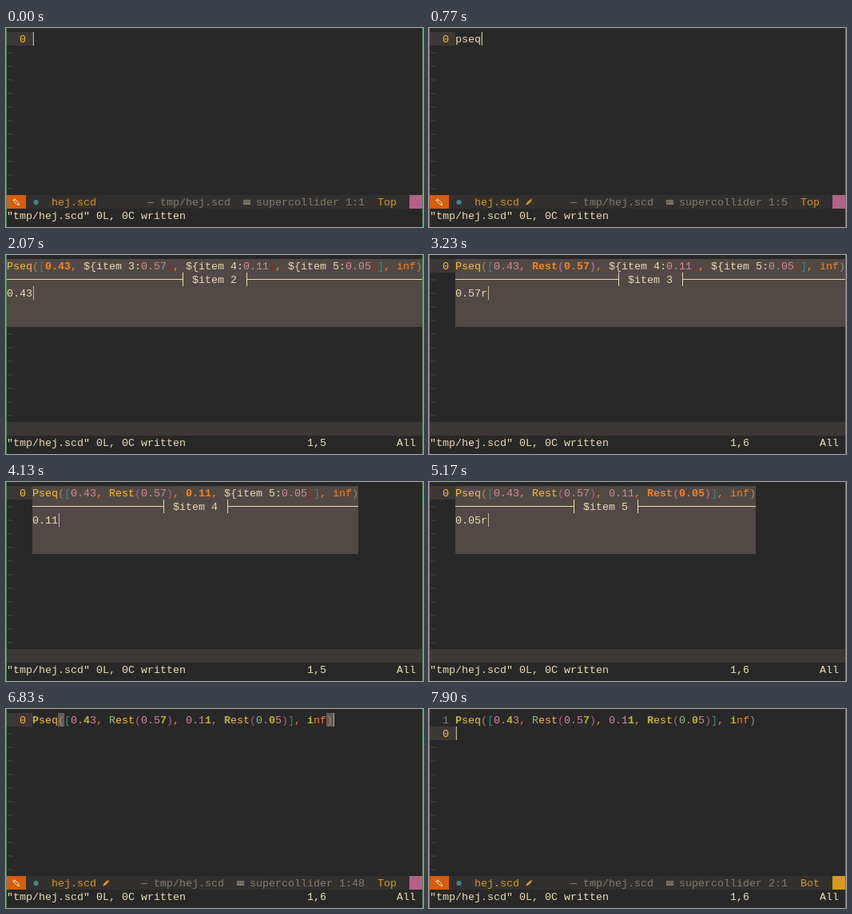
Write an HTML page that moves like this. It is 522 by 249 pixels and loops after 8000 ms.

```html
<!DOCTYPE html>
<html lang="en">
<head>
<meta charset="utf-8">
<title>Snippet expansion in an editor</title>
<style>
html, body { margin: 0; width: 100%; height: 100%; overflow: hidden; background: #282828; }
svg { display: block; width: 522px; height: 249px; }
text { white-space: pre; fill: #ebdbb2; font-family: "Liberation Mono", "Noto Sans Mono", monospace; }
.name, .here { fill: #fabd2f; }
.num { fill: #d3869b; }
.inf, .comma { fill: #fe8019; }
.d1 { fill: #a28c75; }
.d2 { fill: #458588; }
.d3 { fill: #b16286; }
.brace { fill: #9d2a20; }
.on { fill: #fe8019; font-weight: bold; }
.on3 { fill: #b16286; font-weight: bold; }
.first { fill: #b8bb26; font-weight: bold; }
.second { fill: #8ec07c; }
.dim { fill: #867a6c; }
.tilde { fill: #504945; }
.gold { fill: #d79921; }
</style>
</head>
<body>
<svg id="screen" viewBox="0 0 522 249"></svg>
<script>
const LOOP = 8000, CELL = 8, ROW = 17, COLS = 65, GUTTER = 4;
const screen = document.getElementById('screen');
const X = col => 1 + col * CELL;
const Y = row => 5 + row * ROW;

const DONE = 'Pseq([0.43, Rest(0.57), 0.11, Rest(0.05)], inf)';
// jump targets highlighted on the finished line
const FIRST = [0, 8, 20, 27, 30, 37, 43], SECOND = [12, 35];

// start time, item number, code with the active part between stars, field text
const POPUPS = [
  [1200, 1, 'Pseq([${item 2:0.43}, ${item 3:0.57}, ${item 4:0.11}, ${item 5:0.05}], *inf*)', 'inf'],
  [2070, 2, 'Pseq([*0.43*, ${item 3:0.57}, ${item 4:0.11}, ${item 5:0.05}], inf)', '0.43'],
  [2530, 3, 'Pseq([0.43, *0.57*, ${item 4:0.11}, ${item 5:0.05}], inf)', '0.57'],
  [3230, 3, 'Pseq([0.43, *Rest(0.57)*, ${item 4:0.11}, ${item 5:0.05}], inf)', '0.57r'],
  [4130, 4, 'Pseq([0.43, Rest(0.57), *0.11*, ${item 5:0.05}], inf)', '0.11'],
  [4670, 5, 'Pseq([0.43, Rest(0.57), 0.11, *0.05*], inf)', '0.05'],
  [5170, 5, 'Pseq([0.43, Rest(0.57), 0.11, *Rest(0.05)*], inf)', '0.05r']
];
const BLINKS = [[270, 430], [1800, 2070], [5770, 6000], [6500, 6770], [7730, 7900]];

const rect = (x, y, w, h, fill) =>
  `<rect x="${x}" y="${y}" width="${w}" height="${h}" fill="${fill}"/>`;
const put = (col, row, str, cls = '') =>
  `<text x="${X(col)}" y="${Y(row) + 13}" class="${cls}">${str}</text>`;

// split code into [character, class] pairs
function scan(code) {
  const out = [];
  let depth = 0, active = false;
  for (const [tok] of code.matchAll(/\$\{item \d:|[A-Z]\w+|[\d.]+|inf|./g)) {
    if (tok === '*') { active = !active; continue; }
    let cls = '';
    if ('(['.includes(tok)) cls = 'd' + ++depth;
    else if (')]'.includes(tok)) cls = 'd' + depth--;
    else if (tok === '}') cls = 'brace';
    else if (tok === ',') cls = 'comma';
    else if (tok === 'inf') cls = 'inf';
    else if (/^[A-Z]/.test(tok)) cls = 'name';
    else if (/^\d/.test(tok)) cls = 'num';
    if (active) cls = cls === 'd3' ? 'on3' : 'on';
    for (const ch of tok) out.push([ch, cls]);
  }
  return out;
}

function codeLine(col, row, cells) {
  let body = '', last = null;
  for (const [ch, cls] of cells) {
    if (cls !== last) body += (last === null ? '' : '</tspan>') + `<tspan class="${cls}">`;
    body += ch;
    last = cls;
  }
  return put(col, row, body + '</tspan>');
}

function cursor(col, row, t) {
  if (BLINKS.some(([a, b]) => t >= a && t < b)) return '';
  return rect(X(col), Y(row), 1, ROW, '#5a544a') + rect(X(col) + 1, Y(row), 1, ROW, '#bdae93');
}

function gutter(row) {
  let s = rect(1, Y(row), GUTTER * CELL, ROW, '#3c3836') + put(2, row, '0', 'here');
  if (row) s += put(2, 0, '1', 'dim');
  for (let r = row + 1; r < 12; r++) s += put(0, r, '~', 'tilde');
  return s;
}

// upright pencil with its tip at the bottom, turned by an angle
const pencil = (x, y, turn, size, paint) =>
  `<path transform="translate(${x} ${y}) rotate(${turn}) scale(${size})" ${paint}
    d="M-1.6-5.5h3.2v1.2h-3.2zM-1.6-3.7h3.2v6.2L0 6L-1.6 2.5z"/>`;

function statusBar(pos, place, dirty) {
  const y = Y(12), mid = y + 9, c = 57 - pos.length;
  let s = rect(1, y, 520, ROW, '#32302f') + rect(1, y, 24, ROW, '#d65d0e');
  s += pencil(13, mid, -45, 0.85, 'fill="none" stroke="#fbf1c7" stroke-width="1.1"');
  s += `<circle cx="37.5" cy="${mid}" r="3.1" fill="#458588"/>`;
  s += put(7, 12, 'hej.scd', 'gold');
  if (dirty) s += pencil(125, mid, 45, 0.9, 'fill="#d79921"');
  s += rect(X(c - 32), mid, 8, 1, '#867a6c') + put(c - 30, 12, 'tmp/hej.scd', 'dim');
  const k = X(c - 17);
  s += rect(k, mid - 3, 9, 6, '#867a6c');
  s += `<path d="M${k + 1} ${mid - 1.5}h7M${k + 1} ${mid + 0.5}h7" stroke="#32302f" stroke-dasharray="1"/>`;
  s += put(c - 15, 12, 'supercollider ' + pos, 'dim') + put(58, 12, place, 'gold');
  return s + rect(505, y, 16, ROW, place === 'Bot' ? '#d79921' : '#b16286');
}

const blankBar = () => rect(1, Y(12), 520, ROW, '#3c3836');
const ruler = str => put(47, 13, str) + put(61, 13, 'All');

function popup([, item, code, field], t) {
  const cells = scan(code).slice(0, COLS), w = cells.length;
  const left = w + GUTTER > COLS ? 0 : GUTTER;
  const tab = left + (w - 11) / 2;
  const a = X(tab) + 4, b = a + 80, mid = Y(1) + 8, ink = '#ebdbb2';
  return rect(X(left), Y(0), w * CELL, 5 * ROW, '#504945') + codeLine(left, 0, cells) +
    rect(X(left), mid, a - X(left), 1, ink) + rect(a, Y(1), 1, ROW, ink) +
    rect(b, Y(1), 1, ROW, ink) + rect(b, mid, X(left + w) - b, 1, ink) +
    put(tab + 2, 1, '$item ' + item) + put(left, 2, field) +
    cursor(left + field.length, 2, t) + ruler('1,' + (field.length + 1));
}

function typing(t) {
  const step = t < 430 ? -1 : Math.min(8, Math.floor((t - 430) / 42.5));
  const n = Math.min(4, Math.ceil((step + 1) / 2));
  const col = 1 + Math.floor((step + 1) / 2);
  return gutter(0) + put(GUTTER, 0, 'pseq'.slice(0, n)) + cursor(GUTTER + n, 0, t) +
    statusBar('1:' + Math.min(5, col), 'Top', step > 0);
}

function finished(t) {
  const row = t < 7900 ? 0 : 1, marked = t >= 6830;
  const cells = scan(DONE);
  let s = gutter(row);
  if (marked) {
    for (const i of FIRST) cells[i][1] = 'first';
    for (const i of SECOND) cells[i][1] = 'second';
    if (!row) for (const i of [4, 46]) s += rect(X(GUTTER + i), Y(0), CELL, ROW, '#665c54');
  }
  s += codeLine(GUTTER, 0, cells) + cursor(row ? GUTTER : GUTTER + DONE.length, row, t);
  s += t < 6800 ? blankBar() : statusBar(row ? '2:1' : '1:48', row ? 'Bot' : 'Top', true);
  return s + ruler('1,6');
}

function draw(t) {
  let s = rect(0, 0, 522, 249, '#282828');
  for (const x of [0, 521]) s += rect(x, 0, 1, 249, '#55895a');
  if (t < 1200) s += typing(t);
  else if (t < 6770) s += gutter(0) + blankBar() + popup(POPUPS.filter(p => p[0] <= t).pop(), t);
  else s += finished(t);
  return s + put(0, 13, '"tmp/hej.scd" 0L, 0C written');
}

// pick the font size whose advance is exactly one cell
const pen = document.createElement('canvas').getContext('2d');
screen.innerHTML = put(0, 0, '0');
pen.font = '100px ' + getComputedStyle(screen.firstChild).fontFamily;
screen.style.fontSize = CELL * 100 / pen.measureText('0').width + 'px';

let shown = '';
function tick() {
  const next = draw(performance.now() % LOOP);
  if (next !== shown) screen.innerHTML = shown = next;
  requestAnimationFrame(tick);
}
tick();
</script>
</body>
</html>
```
